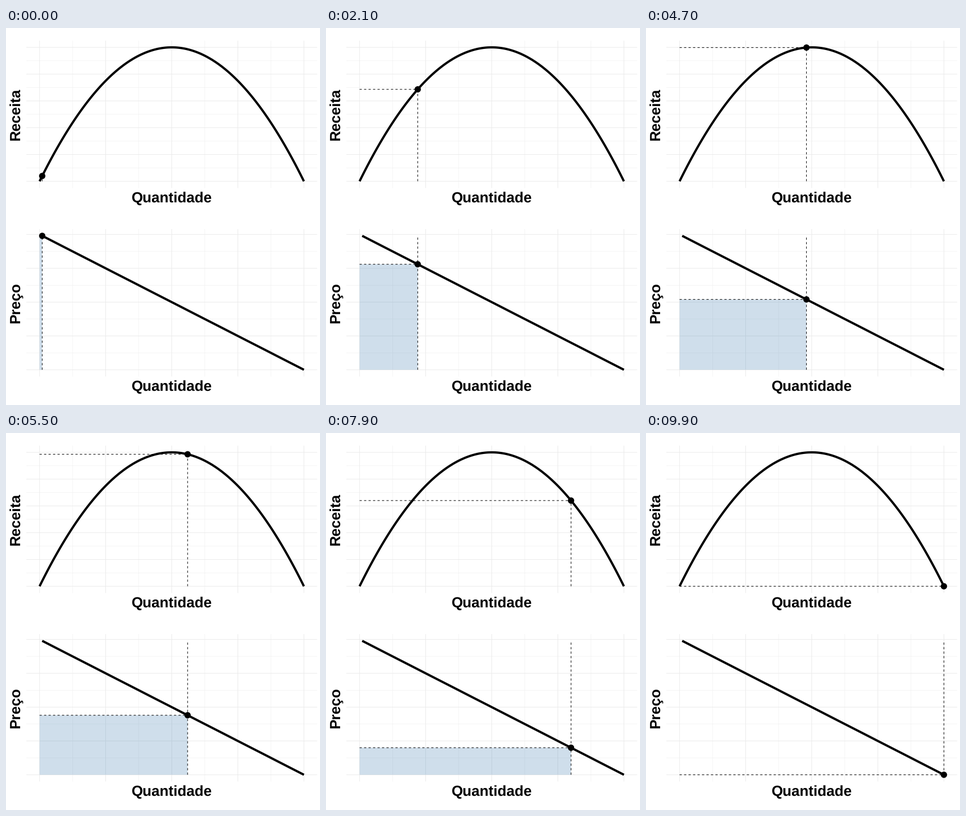
A matplotlib script for the animation above (10000 ms loop, 600x720 px).

```python
import numpy as np
import matplotlib.pyplot as plt
from matplotlib.animation import FuncAnimation
from matplotlib.patches import Circle, Rectangle

W, H, DPI = 600, 720, 72  # at 72 dpi one point is one pixel
plt.rcParams.update({
    "font.family": "Liberation Sans",
    "text.hinting": "none",
    "path.simplify": False,
    "path.snap": False,
})

LEFT, RIGHT = 38.9, 594.5
X0, X1 = 64.15, 569.25
TOP, BOTTOM = 24.15, 305.5
Y0, Y1 = 292.71, 36.94
SHIFT = 360  # vertical offset of the lower panel
THIN, THICK = 1.07, 4.27
GRID = "#EBEBEB"

fig = plt.figure(figsize=(W / DPI, H / DPI), dpi=DPI, facecolor="white")
ax = fig.add_axes([0, 0, 1, 1])
ax.set_xlim(0, W)
ax.set_ylim(H, 0)
ax.axis("off")


def px(q):
    return X0 + (X1 - X0) * q / 100


def revenue_y(q):
    return Y0 + (Y1 - Y0) * q * (100 - q) / 2500


def price_y(q):
    return SHIFT + Y0 + (Y1 - Y0) * (100 - q) / 99


def line(x, y, width, color="black", z=3, **kw):
    return ax.plot(x, y, color=color, lw=width, zorder=z, snap=False,
                   solid_capstyle="butt", dash_capstyle="butt", **kw)[0]


def dashed():
    return line([], [], THIN, z=4, linestyle=(0, (4, 4)))


def dot():
    return ax.add_patch(Circle((0, 0), 6.04, color="black", lw=0, zorder=5))


def panel(dy, y_top, steps, label):
    """Grid and axis titles; steps counts the half intervals on the y axis."""
    for i in range(9):
        x = px(12.5 * i)
        line([x, x], [TOP + dy, BOTTOM + dy], THIN / (1 + i % 2), GRID, z=1)
    for i in range(steps + 1):
        y = Y0 + dy + (y_top - Y0 - dy) * i / steps
        line([LEFT, RIGHT], [y, y], THIN / (1 + i % 2), GRID, z=1)
    font = dict(size=28, weight="bold", ha="center", va="baseline")
    ax.text((LEFT + RIGHT) / 2 - 0.3, 332 + dy, "Quantidade", **font)
    ax.text(26, (TOP + BOTTOM) / 2 + dy, label, rotation=90,
            rotation_mode="anchor", **font)


panel(0, Y1, 10, "Receita")
panel(SHIFT, price_y(0), 8, "Preço")

q_all = np.linspace(0, 100, 201)
line(px(q_all), revenue_y(q_all), THICK)
line(px(q_all[2:]), price_y(q_all[2:]), THICK)

area = ax.add_patch(Rectangle((X0, 0), 0, 0, color="steelblue", alpha=0.26,
                              lw=0, zorder=2, snap=False))
top_v, top_h, low_v, low_h = (dashed() for _ in range(4))
top_dot, low_dot = dot(), dot()


def update(frame):
    q = frame + 1
    x, r, p = px(q), revenue_y(q), price_y(q)
    base = Y0 + SHIFT
    top_v.set_data([x, x], [Y0, r])
    top_h.set_data([X0, x], [r, r])
    low_v.set_data([x, x], [base, price_y(1)])
    low_h.set_data([X0, x], [p, p])
    top_dot.center = x, r
    low_dot.center = x, p
    area.set_bounds(X0, p, x - X0, base - p)
    return area, top_v, top_h, low_v, low_h, top_dot, low_dot


anim = FuncAnimation(fig, update, frames=100, interval=100,
                     repeat=True, repeat_delay=0)
plt.show()
```
